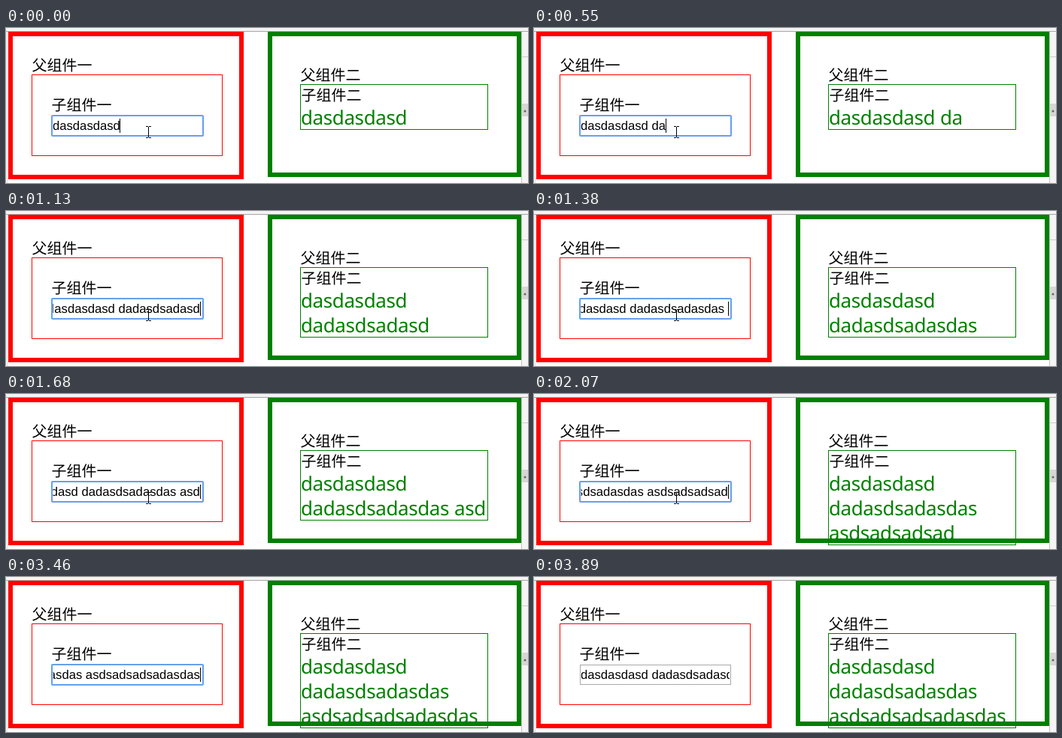
Recreate the animation shown at these times as an HTML page. Size 694 by 207 pixels, loop 3.99 s.

```html
<!DOCTYPE html>
<html lang="zh">
<head>
<meta charset="utf-8">
<title>Linked components</title>
<style>
  html, body { margin: 0; width: 100%; height: 100%; overflow: hidden; background: #fff; }
  svg { display: block; }
  text { white-space: pre; text-rendering: geometricPrecision; }
  .label { font: 20px "Noto Sans CJK SC", "Noto Sans CJK", sans-serif; }
  .field { font: 16.667px "Liberation Sans", Arial, sans-serif; }
  .echo { font: 26px "Noto Sans", sans-serif; letter-spacing: -.4px; word-spacing: .5px; fill: #008000; }
  .red { fill: none; stroke: #f00; }
  .green { fill: none; stroke: #008000; }
  .ibeam { fill: none; stroke: #000; }
</style>
</head>
<body>
<svg width="694" height="207" viewBox="0 0 694 207">
  <defs>
    <clipPath id="inside"><rect x="62.5" y="118" width="197.5" height="25"/></clipPath>
  </defs>

  <!-- window edges -->
  <rect width="694" height="4" fill="#f4f4f4"/>
  <rect y="4" width="694" height="1" fill="#a6a6a6"/>
  <rect x="1" y="5" width="1" height="202" fill="#ddd"/>
  <rect x="686" y="5" width="8" height="202" fill="#f5f5f5"/>
  <rect x="685" y="5" width="1" height="202" fill="#c4c4c4"/>
  <rect x="686" y="38" width="8" height="1" fill="#ccc"/>
  <rect x="686" y="101" width="8" height="17" fill="#d6d6d6"/>
  <circle cx="690" cy="111" r="1.5" fill="#666"/>

  <rect class="red" x="6" y="8" width="307" height="191" stroke-width="6"/>
  <rect class="red" x="34.5" y="62.5" width="253" height="108"/>
  <text class="label" x="34.5" y="57">父组件一</text>
  <text class="label" x="60.5" y="110">子组件一</text>

  <rect id="ring" x="61" y="117" width="201" height="27" rx="1" fill="#fff" stroke="#66a0ea" stroke-width="2"/>
  <rect id="edge" x="61.5" y="117.5" width="200" height="26" fill="#fff" stroke="#a9a9a9"/>
  <g clip-path="url(#inside)"><text class="field" id="field" y="136"></text></g>
  <rect id="caret" y="121" width="1" height="19"/>

  <rect class="green" x="351" y="8" width="331" height="188" stroke-width="6"/>
  <rect class="green" id="box" x="391.5" y="75.5" width="249"/>
  <text class="label" x="391.5" y="70">父组件二</text>
  <text class="label" x="392.5" y="97">子组件二</text>
  <text class="echo" x="392" y="129"></text>
  <text class="echo" x="392" y="162"></text>
  <text class="echo" x="392" y="195"></text>

  <path class="ibeam" id="ibeam" d="M0 .5h3m1 0h3M3.5 1v14M0 15.5h3m1 0h3"/>
  <path id="arrow" d="M332.5 138.5v16l3.7-3.5 2.5 5.7 2.3-1-2.5-5.6h5z" fill="#fff" stroke="#000"/>
</svg>
<script>
const LOOP = 3990, BLUR = 3890;
const TEXT = 'dasdasdasd dadasdsadasdas asdsadsadsadasdas';
const EM = 16.667, LEFT = 62, RIGHT = 258;

// [time, letters typed]
const typing = [[0, 10], [270, 11], [550, 13], [700, 14], [860, 17], [1010, 20], [1130, 23],
  [1250, 25], [1380, 26], [1530, 28], [1680, 29], [1800, 32], [1920, 35], [2070, 38],
  [2190, 40], [2340, 43]];
// [time, shape, x, y]
const mouse = [[0, 'ibeam', 186, 131], [2340, 'arrow'], [2490, 'ibeam', 473, 170],
  [2610, 'ibeam', 475, 170], [2760, 'none']];

const $ = id => document.getElementById(id);
const echo = document.querySelectorAll('.echo');
const show = (id, on) => $(id).setAttribute('visibility', on ? 'visible' : 'hidden');
const at = (list, t) => list.filter(step => step[0] <= t).pop();
const fieldWidth = s => EM * [...s].reduce((w, c) => w + (c === 's' ? .5 : c === ' ' ? .278 : .5562), 0);

// A word drops to the next line once it no longer fits the box.
function wrap(n) {
  const cuts = [0];
  if (n > 18) cuts.push(11);
  if (n > 29) cuts.push(26);
  return cuts.map((cut, i) => TEXT.slice(cut, Math.min(n, cuts[i + 1] ?? n)));
}

function draw() {
  const t = performance.now() % LOOP;
  const n = at(typing, t)[1];
  const focus = t < BLUR;
  const typed = TEXT.slice(0, n);
  const width = fieldWidth(typed);
  const x = focus ? Math.min(LEFT, RIGHT - width) : LEFT;

  $('field').textContent = typed;
  $('field').setAttribute('x', x);
  $('caret').setAttribute('x', Math.floor(x + width + .1));
  show('caret', focus && !(t >= 130 && t < 270) && !(t >= 2900 && t < 3460));
  show('ring', focus);
  show('edge', !focus);

  const lines = wrap(n);
  echo.forEach((el, i) => { el.textContent = lines[i] || ''; });
  $('box').setAttribute('height', 27 + 33 * lines.length);

  const [, shape, mx = 0, my = 0] = at(mouse, t);
  show('ibeam', shape === 'ibeam');
  show('arrow', shape === 'arrow');
  $('ibeam').setAttribute('transform', `translate(${mx} ${my})`);
  requestAnimationFrame(draw);
}
draw();
</script>
</body>
</html>
```
